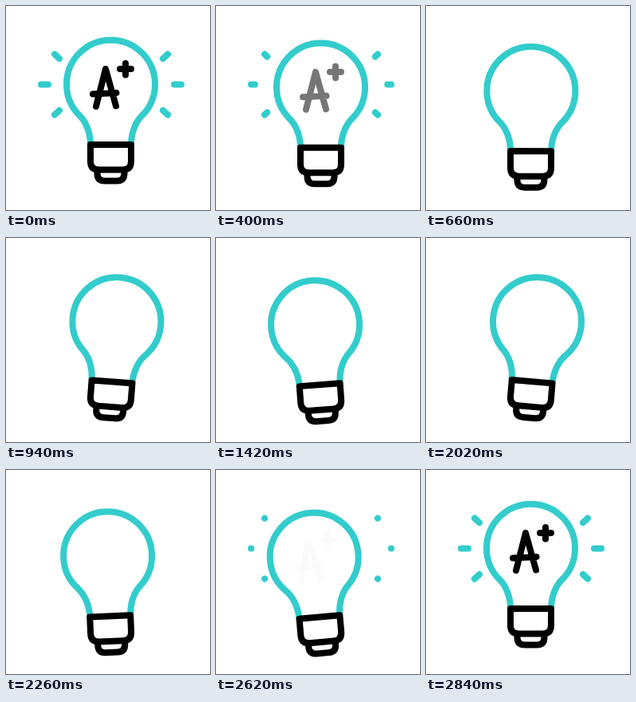
Animation, 256 px wide and 256 px high, one loop 3.02 s. Source, as an HTML page:

```html
<!DOCTYPE html>
<html lang="en">
<head>
<meta charset="utf-8">
<title>Light bulb</title>
<style>
  html, body { margin: 0; width: 100%; height: 100%; overflow: hidden; background: #fff; }
  svg { display: block; width: 100%; height: 100%; }
  path { fill: none; stroke: #000; stroke-width: 8; stroke-linecap: round; stroke-linejoin: round; }
  .cyan { stroke: #33cccc; }
</style>
</head>
<body>
<svg viewBox="0 0 256 256">
  <path id="rays" class="cyan"/>
  <g id="bulb">
    <path class="cyan" style="stroke-linecap: butt"
      d="M106 174C106 160 101 146.2 92.5 137.7A55.5 55.5 0 1 1 170.5 137.7C162 146.2 157 160 157 174"/>
    <path d="M106 174H157V195Q157 205.5 146.5 205.5H116.5Q106 205.5 106 195Z"/>
    <path d="M114.5 206V210Q114.5 219.5 124 219.5H139Q148.5 219.5 148.5 210V206"/>
    <path id="grade" d="M113 126L125 79L138 125.5M109 110.5L138.5 109M143 79H157M150 72V86.5"/>
  </g>
</svg>
<script>
  const LOOP = 3020, DROP = 8.3, TILT = 5.2;
  const SWING_START = 600, HALF_SWING = 455, HALF_SWINGS = 4;
  const [rays, bulb, grade] = ["rays", "bulb", "grade"].map(id => document.getElementById(id));

  const clamp = (x, max) => Math.min(Math.max(x, 0), max);
  const ease = u => (1 - Math.cos(Math.PI * u)) / 2;
  const progress = (t, from, to) => ease(clamp((t - from) / (to - from), 1));

  // Moves to the right first, then swings and stops on the left
  function swing(t) {
    const u = clamp((t - SWING_START) / HALF_SWING, HALF_SWINGS);
    return u < 1 ? ease(u) : Math.cos(Math.PI * (u - 1));
  }

  // Three rays on each side, shrinking towards their outer ends
  function rayPath(size) {
    let d = "";
    for (const side of [-1, 1]) {
      for (const row of [-1, 0, 1]) {
        const slant = Math.abs(row);
        const x = 132 + side * (88 - 17 * slant), y = 98.5 + 38 * row;
        d += `M${x} ${y}l${-side * (9 - 3 * slant) * size} ${-5.5 * row * size}`;
      }
    }
    return d;
  }

  function draw(now) {
    const t = now % LOOP;
    const off = progress(t, 210, 610) - progress(t, 2600, 2840), on = 1 - off;
    bulb.setAttribute("transform", `translate(0 ${DROP * off}) rotate(${TILT * off * swing(t)} 157 193)`);
    grade.setAttribute("opacity", on);
    rays.setAttribute("d", on > 0.001 ? rayPath(on) : "");
  }

  const start = performance.now();
  function tick() {
    draw(performance.now() - start);
    requestAnimationFrame(tick);
  }
  tick();
</script>
</body>
</html>
```
